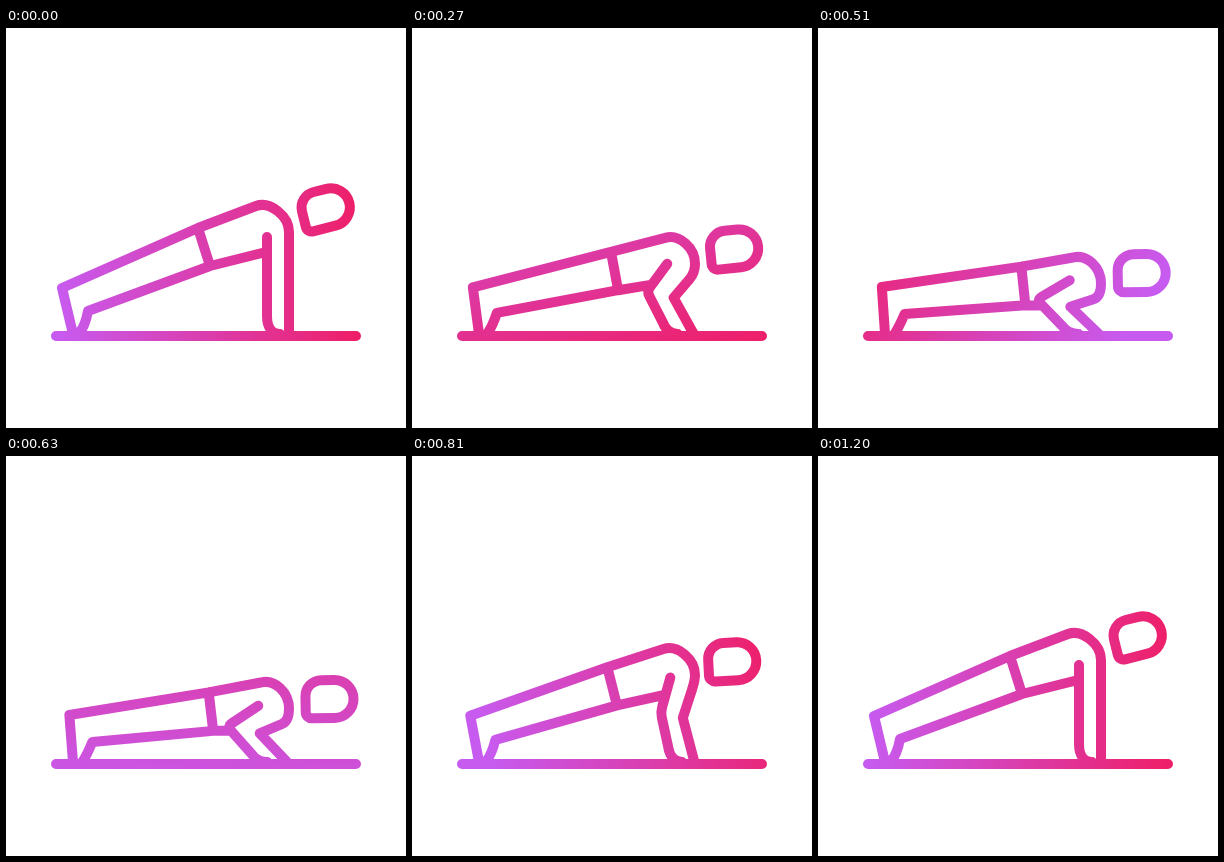
These frames come from a looping animation (400 by 400 pixels, 1.33 s). An HTML page with a canvas:

```html
<!DOCTYPE html>
<html lang="en">
<head>
<meta charset="utf-8">
<title>Push-up</title>
<style>
  html, body { margin: 0; width: 100%; height: 100%; overflow: hidden; background: #fff; }
  canvas { display: block; width: 400px; height: 400px; }
</style>
</head>
<body>
<canvas id="stage"></canvas>
<script>
const LOOP = 1330, STEP = 30, END = 1200;
const canvas = document.getElementById('stage');
const ctx = canvas.getContext('2d');
const dpr = window.devicePixelRatio || 1;
canvas.width = canvas.height = 400 * dpr;
ctx.scale(dpr, dpr);

const times = [0, 150, 390, 510, 630, 810, 930, 990, 1110, 1200];
const tracks = {
  depth: [0, .3, .92, 1.03, .97, .3, -.07, -.08, -.035, 0],
  headX: [320, 321, 323.3, 323.7, 323.5, 320.3, 318.5, 318.3, 319.3, 320],
  headY: [180.5, 201, 237.5, 245, 243, 205.5, 173.5, 173, 177, 180.5],
  tilt: [-14, -9, -3, -1, -1, -3, -22, -22, -17, -14],
  hue: [0, 25, 140, 210, 275, 340, 354, 357, 360, 360]
};

// Smooth interpolation that never overshoots its keys
function sample(v, t) {
  const slope = i => (v[i + 1] - v[i]) / (times[i + 1] - times[i]);
  const tangent = i => {
    if (i === 0 || i === v.length - 1) return 0;
    const a = slope(i - 1), b = slope(i);
    return a * b > 0 ? 2 * a * b / (a + b) : 0;
  };
  let i = 0;
  while (i < times.length - 2 && t >= times[i + 1]) i++;
  const h = times[i + 1] - times[i], s = (t - times[i]) / h;
  const s2 = s * s, s3 = s2 * s;
  return v[i] * (2 * s3 - 3 * s2 + 1) + v[i + 1] * (3 * s2 - 2 * s3)
    + h * (tangent(i) * (s3 - 2 * s2 + s) + tangent(i + 1) * (s3 - s2));
}

const mix = (a, b, k) => [a[0] + (b[0] - a[0]) * k, a[1] + (b[1] - a[1]) * k];
const head = new Path2D('M-24 13V-3A16 16 0 0 1-8-19H5A19 19 0 0 1 5 19H-18A6 6 0 0 1-24 13Z');

function figure(p) {
  const bend = Math.max(p, 0);
  const waist = [192 + 11 * p, 200 + 37.5 * p];
  const hip = [204 + 3.3 * p, 238 + 38 * p];
  const neck = [250 + 5 * p, 178 + 50 * p];
  const path = new Path2D();

  // Back, shoulder and outer arm
  const corner = [283, neck[1] + 28 + 11 * p];
  const elbow = [283 - 30 * Math.pow(bend, .75), 255 + 23 * p];
  path.moveTo(67, 306);
  path.lineTo(56 + 7.6 * p, 260 - p);
  path.lineTo(...waist);
  path.lineTo(...neck);
  path.bezierCurveTo(neck[0] + 14, neck[1] - 5 + 1.5 * p, 283, neck[1] + 10, 283, neck[1] + 26);
  path.quadraticCurveTo(...corner, ...mix(corner, elbow, .25));
  path.lineTo(...elbow);
  path.lineTo(283 - 2 * bend, 306);

  // Foot, leg and belly
  path.moveTo(73 + 4 * p, 305);
  path.quadraticCurveTo(79 + 2 * p, 299, 82 + 4.5 * p, 283 + 3 * p);
  path.lineTo(...hip);
  path.lineTo(260 - 36 * p, 224 + 52 * p);
  path.moveTo(...waist);
  path.lineTo(...hip);

  // Inner arm
  const top = [261 - 9 * bend, 209 + 42 * p];
  const inner = [261 - 41 * bend, 250 + 21 * p];
  const wrist = [261 - 16 * bend, 288 + 10 * p];
  path.moveTo(...top);
  path.lineTo(...mix(inner, top, .15));
  path.quadraticCurveTo(...inner, ...mix(inner, wrist, .15));
  path.lineTo(...wrist);
  path.bezierCurveTo(wrist[0] + 5 * p, wrist[1] + 11 - 4 * p, 266 - 9 * p, 306, 274 - 13 * p, 306);

  // Floor
  path.moveTo(50, 308);
  path.lineTo(350, 308);
  return path;
}

function paint(angle) {
  const a = angle * Math.PI / 180, dx = 150 * Math.cos(a), dy = 150 * Math.sin(a);
  const g = ctx.createLinearGradient(200 - dx, 200 - dy, 200 + dx, 200 + dy);
  g.addColorStop(0, '#c75bf0');
  g.addColorStop(1, '#ee1f69');
  return g;
}

function draw(t) {
  const at = name => sample(tracks[name], t);
  const path = figure(at('depth'));
  path.addPath(head, new DOMMatrix().translate(at('headX'), at('headY')).rotate(at('tilt')));
  ctx.fillStyle = '#fff';
  ctx.fillRect(0, 0, 400, 400);
  ctx.lineWidth = 10;
  ctx.lineCap = ctx.lineJoin = 'round';
  ctx.strokeStyle = paint(at('hue'));
  ctx.stroke(path);
}

const start = performance.now();
function tick() {
  const t = (performance.now() - start) % LOOP;
  draw(Math.min(Math.floor(t / STEP) * STEP, END));
  requestAnimationFrame(tick);
}
tick();
</script>
</body>
</html>
```
